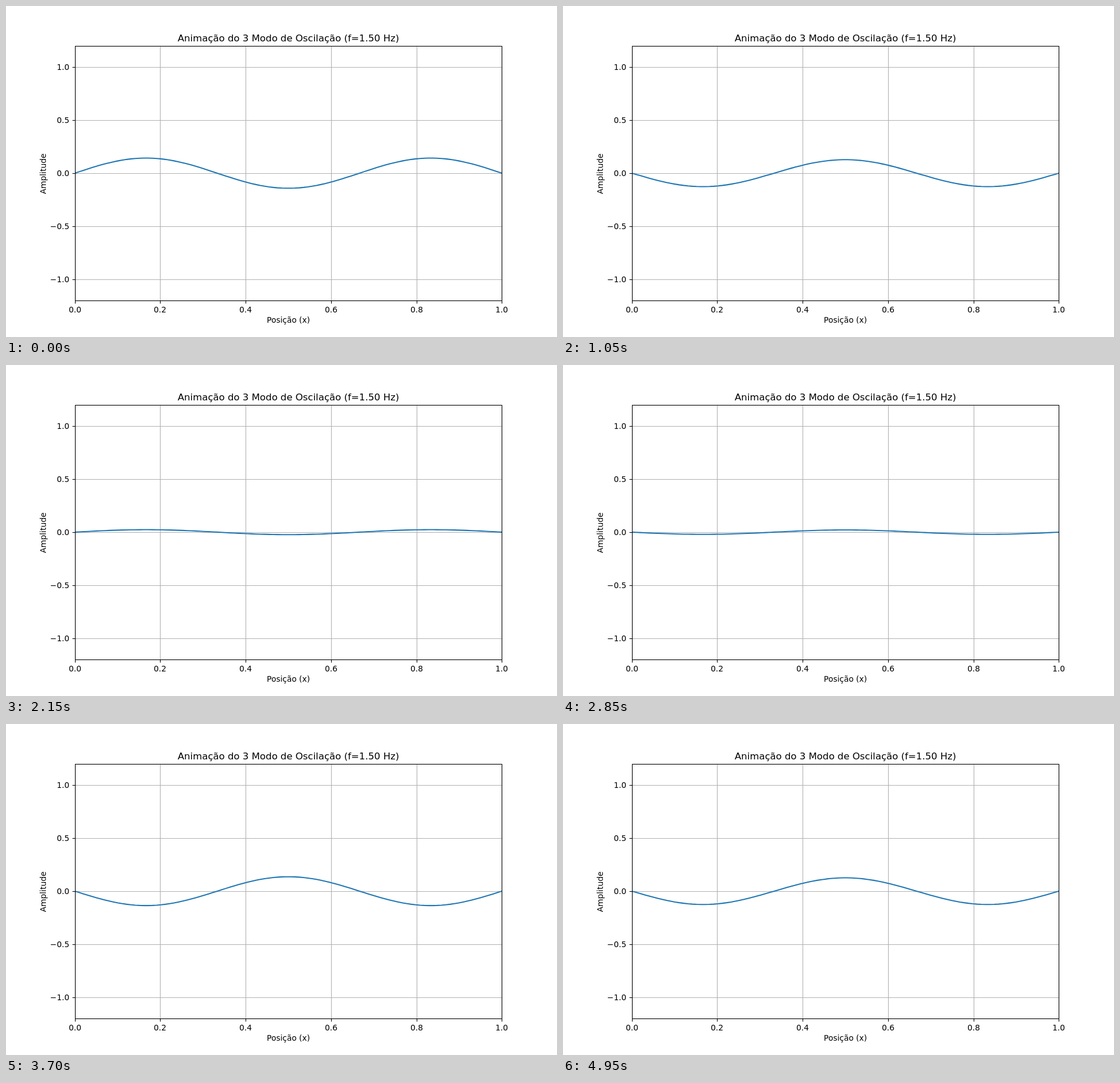
Recreate the animation shown at these times as an HTML page with a canvas. Size 966 by 580 pixels, loop 5 s.

```html
<!DOCTYPE html>
<html lang="pt">
<head>
<meta charset="utf-8">
<title>Modo de oscilação</title>
<style>
html, body { margin: 0; width: 100%; height: 100%; overflow: hidden; background: #fff; }
canvas { display: block; }
</style>
</head>
<body>
<canvas id="stage" width="966" height="580"></canvas>
<script>
const ctx = document.getElementById('stage').getContext('2d');
const LOOP = 5000, STEP = 50;
const PT = 100 / 72;
const left = 120.75, width = 748.65, top0 = 69.6, height = 446.6;
const px = x => left + x * width;
const py = y => top0 + (1.2 - y) / 2.4 * height;
const snap = v => Math.floor(v + 0.5) + 0.5;
const L = snap(px(0)), R = snap(px(1)), T = snap(py(1.2)), B = snap(py(-1.2));

// Third eigenmode of a string with fixed ends, split into finite differences
const MODE = 3, SEGMENTS = 99;
const peak = Math.sqrt(2 / SEGMENTS);
const omega = 2 * SEGMENTS * Math.sin(MODE * Math.PI / (2 * SEGMENTS));

function line(x1, y1, x2, y2, color) {
  ctx.strokeStyle = color;
  ctx.lineWidth = 0.8 * PT;
  ctx.beginPath();
  ctx.moveTo(x1, y1);
  ctx.lineTo(x2, y2);
  ctx.stroke();
}

function text(str, x, y, align = 'center', size = 10) {
  ctx.font = `${size * PT}px "DejaVu Sans", sans-serif`;
  ctx.textAlign = align;
  ctx.fillStyle = '#000';
  ctx.fillText(str, x, y);
}

function drawAxes() {
  for (let i = 0; i <= 5; i++) {
    const x = snap(px(i / 5));
    line(x, T, x, B, '#b0b0b0');
    line(x, B, x, B + 5, '#000');
    text((i / 5).toFixed(1), x - 0.5, 537);
  }
  for (let i = -2; i <= 2; i++) {
    const y = snap(py(i / 2));
    line(L, y, R, y, '#b0b0b0');
    line(L - 5, y, L, y, '#000');
    text((i / 2).toFixed(1).replace('-', '\u2212'), 111, y + 4.5, 'right');
  }
  text('Animação do 3 Modo de Oscilação (f=1.50 Hz)', px(0.5), 62, 'center', 12);
  text('Posição (x)', px(0.5), 555);
  ctx.save();
  ctx.translate(70, 294);
  ctx.rotate(-Math.PI / 2);
  text('Amplitude', 0, 0);
  ctx.restore();
}

function drawWave(seconds) {
  const amp = peak * Math.cos(omega * seconds);
  ctx.save();
  ctx.beginPath();
  ctx.rect(121, 70, 748, 446);
  ctx.clip();
  ctx.strokeStyle = '#1f77b4';
  ctx.lineWidth = 1.5 * PT;
  ctx.lineCap = 'square';
  ctx.lineJoin = 'round';
  ctx.beginPath();
  for (let i = 0; i <= SEGMENTS; i++) {
    const x = i / SEGMENTS;
    ctx.lineTo(px(x), py(amp * Math.sin(MODE * Math.PI * x)));
  }
  ctx.stroke();
  ctx.restore();
}

function drawFrame() {
  const tick = Math.floor(performance.now() % LOOP / STEP);
  ctx.fillStyle = '#fff';
  ctx.fillRect(0, 0, 966, 580);
  drawAxes();
  drawWave(tick * STEP / 1000);
  ctx.strokeStyle = '#000';
  ctx.lineWidth = 0.8 * PT;
  ctx.strokeRect(L, T, R - L, B - T);
  requestAnimationFrame(drawFrame);
}
drawFrame();
</script>
</body>
</html>
```
